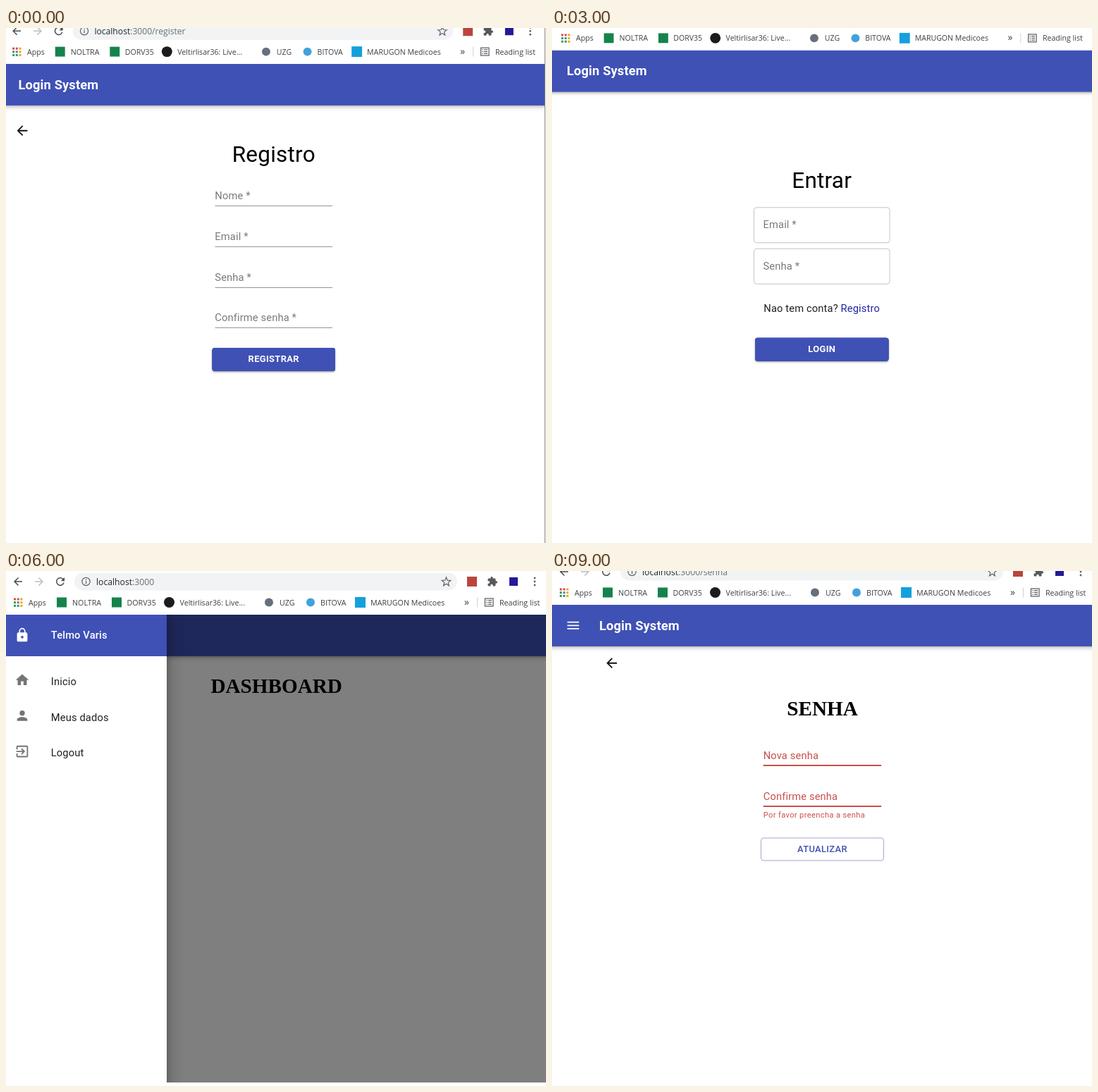
An HTML page with a canvas that plays this animation: 766x731 px, repeating every 10 s.

```html
<!DOCTYPE html>
<html lang="pt">
<head>
<meta charset="utf-8">
<title>Login System</title>
<style>
html, body { margin: 0; width: 100%; height: 100%; overflow: hidden; background: #fff; }
canvas { display: block; }
</style>
</head>
<body>
<canvas id="stage" width="766" height="731"></canvas>
<script>
const W = 766, H = 731, HOLD = 1000;
const ctx = document.getElementById('stage').getContext('2d');

const BLUE = '#3f51b5', PINK = '#f50057', RED = '#cb4f4b', LINK = '#2424a4';
const INK = '#212121', GREY = '#7a7a7a', RULE = '#959595', BAR_ICON = '#5f6368';
const USER = 'Telmo Varis', MAIL = 'caracol.lil@example.com';

// 24-unit icon outlines
const ICON = {
  back: 'M20 11H7.83l5.59-5.59L12 4l-8 8 8 8 1.41-1.41L7.83 13H20z',
  menu: 'M3 18h18v-2H3zM3 13h18v-2H3zM3 6v2h18V6z',
  home: 'M10 20v-6h4v6h5v-8h3L12 3 2 12h3v8z',
  person: 'M12 12a4 4 0 1 0 0-8 4 4 0 0 0 0 8zm0 2c-2.67 0-8 1.34-8 4v2h16v-2c0-2.66-5.33-4-8-4z',
  exit: 'M10.09 15.59L11.5 17l5-5-5-5-1.41 1.41L12.67 11H3v2h9.67zM19 3H5a2 2 0 0 0-2 2v4h2V5h14v14H5v-4H3v4a2 2 0 0 0 2 2h14a2 2 0 0 0 2-2V5a2 2 0 0 0-2-2z',
  lock: 'M18 8h-1V6A5 5 0 0 0 7 6v2H6a2 2 0 0 0-2 2v10a2 2 0 0 0 2 2h12a2 2 0 0 0 2-2V10a2 2 0 0 0-2-2zm-6 9a2 2 0 1 1 0-4 2 2 0 0 1 0 4zm3.1-9H8.9V6a3.1 3.1 0 0 1 6.2 0z',
  key: 'M12.65 10a6 6 0 1 0 0 4H17v4h4v-4h2v-4zM7 14a2 2 0 1 1 0-4 2 2 0 0 1 0 4z',
  reload: 'M17.65 6.35A8 8 0 1 0 19.73 14h-2.08A6 6 0 1 1 16.22 7.78L13 11h7V4z',
  puzzle: 'M20.5 11H19V7a2 2 0 0 0-2-2h-4V3.5a2.5 2.5 0 0 0-5 0V5H4a2 2 0 0 0-2 2v3.8h1.5a2.7 2.7 0 0 1 0 5.4H2V20a2 2 0 0 0 2 2h3.8v-1.5a2.7 2.7 0 0 1 5.4 0V22H17a2 2 0 0 0 2-2v-4h1.5a2.5 2.5 0 0 0 0-5z'
};
for (const name in ICON) ICON[name] = new Path2D(ICON[name]);

function icon(name, cx, cy, size, color) {
  ctx.save();
  ctx.translate(cx - size / 2, cy - size / 2);
  ctx.scale(size / 24, size / 24);
  ctx.fillStyle = color;
  ctx.fill(ICON[name], 'evenodd');
  ctx.restore();
}

function text(str, x, y, size, color, { weight = 400, family = 'Roboto, sans-serif', align = 'left', track = 0 } = {}) {
  ctx.font = `${weight} ${size}px ${family}`;
  ctx.letterSpacing = track * size + 'px';
  ctx.textAlign = align;
  ctx.fillStyle = color;
  ctx.fillText(str, x, y);
  return ctx.measureText(str).width;
}

const ui = (str, x, y, size, color) => text(str, x, y, size, color, { family: '"Open Sans", sans-serif' });
const body = (str, x, y, color = INK) => text(str, x, y, 14.7, color, { track: .0094 });
const small = (str, x, y, color = GREY) => text(str, x, y, 11.1, color, { track: .0094 });
const helper = (str, x, y) => text(str, x, y, 11.1, RED, { track: .0333 });
const title = (str, x, y) => text(str, x, y, 31.5, '#000', { align: 'center', track: .0074 });
const heading = (str, x, y) =>
  text(str, x, y, 29.2, '#000', { weight: 700, family: '"Liberation Serif", serif', align: 'center' });

function rect(x, y, w, h, color) {
  ctx.fillStyle = color;
  ctx.fillRect(x, y, w, h);
}

function rounded(x, y, w, h, r) {
  ctx.beginPath();
  ctx.roundRect(x, y, w, h, r);
}

function disc(x, y, r, color) {
  ctx.beginPath();
  ctx.arc(x, y, r, 0, 7);
  ctx.fillStyle = color;
  ctx.fill();
}

function raised(color, layers) {
  ctx.save();
  ctx.fillStyle = color;
  for (const [dy, blur, alpha] of layers) {
    ctx.shadowColor = `rgba(0,0,0,${alpha})`;
    ctx.shadowOffsetY = dy;
    ctx.shadowBlur = blur;
    ctx.fill();
  }
  ctx.restore();
}

function star(cx, cy, r) {
  ctx.beginPath();
  for (let i = 0; i < 10; i++) {
    const a = i * Math.PI / 5 - Math.PI / 2, d = i % 2 ? r * .43 : r;
    ctx.lineTo(cx + d * Math.cos(a), cy + d * Math.sin(a));
  }
  ctx.closePath();
  ctx.strokeStyle = BAR_ICON;
  ctx.lineWidth = 1.2;
  ctx.stroke();
}

function addressBar(path, key) {
  icon('back', 15, 16.5, 18, '#4a4d51');
  ctx.save();
  ctx.translate(90, 0);
  ctx.scale(-1, 1);
  icon('back', 45, 16.5, 18, '#bcbec1');
  ctx.restore();
  icon('reload', 75, 16.5, 18, '#4a4d51');

  rounded(95, 4, 543, 25, 12.5);
  ctx.fillStyle = '#f1f3f4';
  ctx.fill();
  ctx.beginPath();
  ctx.arc(111.5, 16.5, 5.6, 0, 7);
  ctx.strokeStyle = BAR_ICON;
  ctx.lineWidth = 1.2;
  ctx.stroke();
  rect(110.9, 15.6, 1.3, 4, BAR_ICON);
  rect(110.9, 13.2, 1.3, 1.3, BAR_ICON);
  const w = ui('localhost', 126, 21, 12.2, '#25282c');
  ui(':3000' + path, 126 + w, 21, 12.2, '#6c7075');

  if (key) icon('key', 592.5, 16.5, 15, BAR_ICON);
  star(622.5, 17, 6.6);
  rect(652, 9.5, 14, 14, '#b8463c');
  icon('puzzle', 688, 16.5, 15.5, '#55585c');
  rect(712, 10.5, 12, 12, '#241a96');
  for (const y of [11.5, 16.5, 21.5]) disc(748, y, 1.4, BAR_ICON);
}

function bookmarks() {
  const dots = ['#e0483c', '#e0483c', '#e9a820', '#3a9a55', '#4a80d8', '#e9a820', '#3a9a55', '#3a9a55', '#e9a820'];
  dots.forEach((c, i) => rect(9 + i % 3 * 4.7, 40 + Math.floor(i / 3) * 4.7, 3, 3, c));
  rect(70, 39, 14, 14, '#16834c');
  rect(148, 39, 14, 14, '#16834c');
  disc(229.5, 46, 7.5, '#1c1c1c');
  disc(371, 46, 6, '#65707c');
  disc(430, 46, 6, '#41a2da');
  rect(493, 38.5, 15, 15, '#14a0dc');
  const labels = [['Apps', 30], ['NOLTRA', 92], ['DORV35', 169.5], ['Veltirlisar36: Live...', 244.5],
    ['UZG', 386], ['BITOVA', 444], ['MARUGON Medicoes', 515], ['Reading list', 698]];
  for (const [s, x] of labels) ui(s, x, 50, 10.7, '#3c4043');
  ui('»', 648, 50, 14, '#3c4043');
  rect(666, 39, 1, 14, '#cfd1d4');
  ctx.strokeStyle = '#55585c';
  ctx.lineWidth = 1.2;
  ctx.strokeRect(677.5, 40.5, 11.5, 11);
  for (const y of [42.6, 45.4, 48.2]) {
    rect(679.5, y, 1.4, 1.2, '#55585c');
    rect(682, y, 5, 1.2, '#55585c');
  }
}

// Browser strip; top is where the page begins
function browser(top, x, scale, path, key) {
  ctx.save();
  ctx.translate(x - 30 * scale, top - 63.5 * scale);
  ctx.scale(scale, scale);
  addressBar(path, key);
  bookmarks();
  ctx.restore();
}

function appBar(top, { x = 17.5, menu = false } = {}) {
  ctx.save();
  ctx.beginPath();
  ctx.rect(0, top, W, H);
  ctx.clip();
  ctx.beginPath();
  ctx.rect(-10, top, W + 20, 58.6);
  raised(BLUE, [[1.5, 3, .2], [3, 5, .12], [1, 9, .1]]);
  ctx.restore();
  if (menu) icon('menu', 30, top + 29.3, 22.2, '#fff');
  text('Login System', menu ? 67 : x, top + 35.7, 18.3, '#fff', { weight: 600, track: .0075 });
}

function button(str, x, y, w, color, outlined) {
  if (outlined) {
    rounded(x + .5, y + .5, w - 1, 32, 3.7);
    ctx.strokeStyle = '#a2a7cc';
    ctx.lineWidth = 1;
    ctx.stroke();
  } else {
    rounded(x, y, w, 33, 3.7);
    raised(color, [[1, 1, .2], [2, 2, .14], [1, 5, .12]]);
  }
  text(str, x + w / 2, y + 20.3, 12.9, outlined ? color : '#fff',
    { weight: outlined ? 500 : 600, align: 'center', track: .0286 });
}

function underline(x, y, w, color = RULE, h = 1) {
  rect(x, y, w, h, color);
}

function outlinedField(label, y, { value, dots = 0, error = false, autofill = false } = {}) {
  rounded(285.5, y + .5, 192.5, 50, 3.7);
  if (autofill) {
    ctx.fillStyle = '#e8f0fe';
    ctx.fill();
  }
  ctx.strokeStyle = error ? RED : autofill ? '#b4b9c4' : '#c4c4c4';
  ctx.lineWidth = 1;
  ctx.stroke();
  if (!value && !dots) return body(label, 298.5, y + 30, GREY);
  rect(293, y - 1, label === 'Email *' ? 45 : 48, 3, '#fff');
  small(label, 297.5, y + 3.5, error ? RED : GREY);
  if (value) body(value, 298, y + 30, '#000');
  for (let i = 0; i < dots; i++) disc(300.5 + i * 5.15, y + 24.5, 1.6, '#111');
}

function loginForm(y, dx, { mail, dots, wrong } = {}) {
  ctx.save();
  ctx.translate(dx, 0);
  const second = y + 58.5 + (wrong === 'mail' ? 21.5 : 0);
  const low = y + (wrong ? 21.5 : 0);
  title('Entrar', 381.7, y - 27);
  outlinedField('Email *', y, { value: mail, autofill: !!mail && wrong !== 'mail', error: wrong === 'mail' });
  outlinedField('Senha *', second, { dots, error: wrong === 'pass' });
  if (wrong === 'mail') helper('Email invalido', 297.5, y + 66);
  if (wrong === 'pass') helper('Senha invalida', 297.5, second + 66);
  const w = body('Nao tem conta? ', 299.3, low + 148.5);
  body('Registro', 299.3 + w, low + 148.5, LINK);
  button('LOGIN', 287, low + 185.5, 189.5, BLUE);
  ctx.restore();
}

function register() {
  browser(51, 30, .994, '/register');
  appBar(51);
  icon('back', 23, 145.7, 22.2, '#111');
  title('Registro', 379.8, 189.5);
  ['Nome *', 'Email *', 'Senha *', 'Confirme senha *'].forEach((label, i) => {
    body(label, 296.3, 243 + i * 57.8, GREY);
    underline(296.5, Math.round(252 + i * 57.8), 166.5);
  });
  button('REGISTRAR', 292.5, 454, 174.5, BLUE);
  windowEdge();
}

function windowEdge() {
  rect(764, 0, 2, H, '#fff');
  rect(764, 0, 1, H, '#858585');
}

function login(top, x, scale, key, titleX, y, dx, state) {
  browser(top, x, scale, '/login', key);
  appBar(top, { x: titleX });
  loginForm(y, dx, state);
}

function dashboard() {
  browser(38.4, 32, .994, '');
  appBar(38.4, { menu: true });
  heading('DASHBOARD', 382, 149);
}

function drawer() {
  const top = 62, bottom = 726;
  browser(top, 32, 1, '');
  appBar(top, { menu: true });
  heading('DASHBOARD', 383.7, 173);
  rect(0, top, W, bottom - top, 'rgba(0,0,0,.5)');
  rect(0, bottom, W, H - bottom, '#fff');

  ctx.save();
  ctx.beginPath();
  ctx.rect(0, top, W, bottom - top);
  ctx.clip();
  ctx.beginPath();
  ctx.rect(0, top - 40, 228, bottom - top + 80);
  raised('#fff', [[7, 9, .2], [14, 22, .14], [5, 28, .12]]);
  ctx.restore();
  rect(0, top, 228, 59, BLUE);
  icon('lock', 23, 91, 22.2, '#fff');
  text(USER, 63.8, 96, 14.7, '#fff', { weight: 500, track: .0094 });
  [['home', 'Inicio'], ['person', 'Meus dados'], ['exit', 'Logout']].forEach(([name, label], i) => {
    icon(name, 23, 154.7 + i * 50.7, 22.2, '#757575');
    body(label, 63.8, 162 + i * 50.7);
  });
}

function profile() {
  browser(49.6, 32, .997, '/perfil', true);
  appBar(49.6, { menu: true });
  icon('back', 84.7, 132.3, 22.2, '#111');
  heading('PERFIL', 382.5, 192.5);
  [['Nome', USER], ['Email', MAIL]].forEach(([label, value], i) => {
    const y = i * 58.8;
    small(label, 74.5, 238 + y);
    body(value, 74.5, 262 + y, '#303030');
    underline(74.5, Math.round(271 + y), 616);
  });
  button('TROCAR SENHA', 66, 356.3, 129, PINK);
  button('ATUALIZAR', 66, 407.7, 129, BLUE, true);
}

function password(error) {
  const color = error ? RED : GREY;
  browser(48, 32, 1, '/senha');
  appBar(48, { menu: true });
  icon('back', 84.7, 130.7, 22.2, '#111');
  heading('SENHA', 383.5, 205.3);
  ['Nova senha', 'Confirme senha'].forEach((label, i) => {
    body(label, 299.7, 267 + i * 58, color);
    underline(299.7, 275 + i * 58, 167.5, error ? RED : RULE, error ? 2 : 1);
  });
  if (error) helper('Por favor preencha a senha', 299.7, 350);
  button('ATUALIZAR', 296, error ? 378.5 : 360, 175, BLUE, true);
  if (!error) windowEdge();
}

const screens = [
  register,
  () => login(63.6, 30, 1, true, 17.5, 249.7, 0, { mail: MAIL, dots: 9, wrong: 'mail' }),
  () => login(63.6, 30, 1, true, 17.5, 249.7, 0, { mail: MAIL, dots: 9, wrong: 'pass' }),
  () => login(31.7, 34, .991, false, 21, 254.3, 1, {}),
  () => login(27.7, 32, .994, true, 19, 250.3, 0, { mail: MAIL, dots: 9 }),
  dashboard,
  drawer,
  profile,
  () => password(false),
  () => password(true)
];

function draw() {
  rect(0, 0, W, H, '#fff');
  screens[Math.floor(performance.now() / HOLD) % screens.length]();
  requestAnimationFrame(draw);
}
draw();
</script>
</body>
</html>
```
